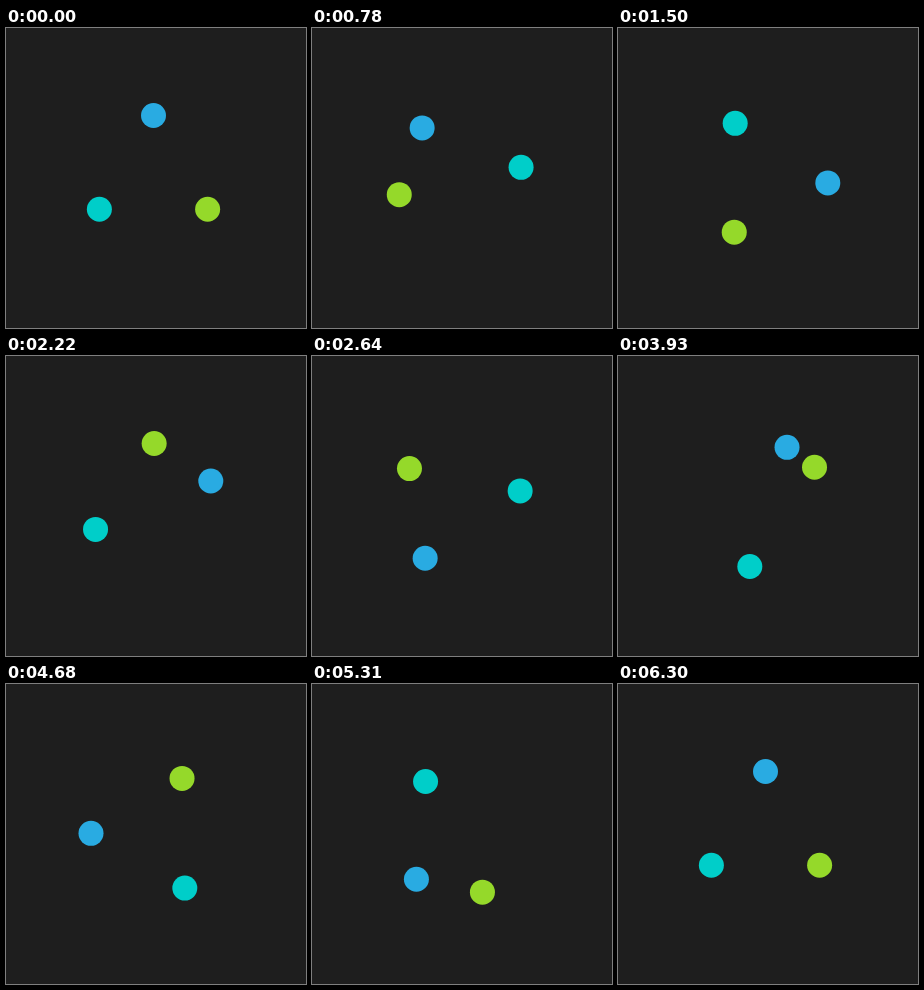
These frames come from a looping animation (300 px wide and 300 px high, 6330 ms). An HTML page with a canvas:

```html
<!DOCTYPE html>
<html lang="en">
<head>
<meta charset="utf-8">
<title>Orbiting dots</title>
<style>
html, body { margin: 0; width: 100%; height: 100%; overflow: hidden; background: #1e1e1e; }
canvas { display: block; width: 300px; height: 300px; }
</style>
</head>
<body>
<canvas id="stage"></canvas>
<script>
const LOOP = 6330, TICK = 30;
const STEP = 1500, STEPS = 4, TURN = -270;
const CX = 147.5, CY = 150, ORBIT = 62.5, RADIUS = 12.5;

const dots = [
  { color: '#95d92a', angle: 120, delay: 0 },
  { color: '#00cec9', angle: 240, delay: 150 },
  { color: '#29abe2', angle: 0, delay: 300 }
];

const canvas = document.getElementById('stage');
const ctx = canvas.getContext('2d');
const ratio = window.devicePixelRatio || 1;
canvas.width = canvas.height = 300 * ratio;
ctx.scale(ratio, ratio);

// cubic-bezier(.75, 0, 0, 1), solved by bisection
function ease(x) {
  let lo = 0, hi = 1;
  for (let i = 0; i < 30; i++) {
    const s = (lo + hi) / 2;
    if (2.25 * s * (1 - s) * (1 - s) + s * s * s < x) lo = s;
    else hi = s;
  }
  return lo * lo * (3 - 2 * lo);
}

function turned(time) {
  const p = Math.min(Math.max(time / STEP, 0), STEPS);
  const whole = Math.floor(p);
  return TURN * (whole + ease(p - whole));
}

function draw(time) {
  ctx.fillStyle = '#1e1e1e';
  ctx.fillRect(0, 0, 300, 300);
  for (const dot of dots) {
    const a = (dot.angle + turned(time - dot.delay)) * Math.PI / 180;
    ctx.fillStyle = dot.color;
    ctx.beginPath();
    ctx.arc(CX + ORBIT * Math.sin(a), CY - ORBIT * Math.cos(a), RADIUS, 0, Math.PI * 2);
    ctx.fill();
  }
}

const start = performance.now();
function frame() {
  const time = (performance.now() - start) % LOOP;
  draw(Math.floor(time / TICK) * TICK);
  requestAnimationFrame(frame);
}
frame();
</script>
</body>
</html>
```
